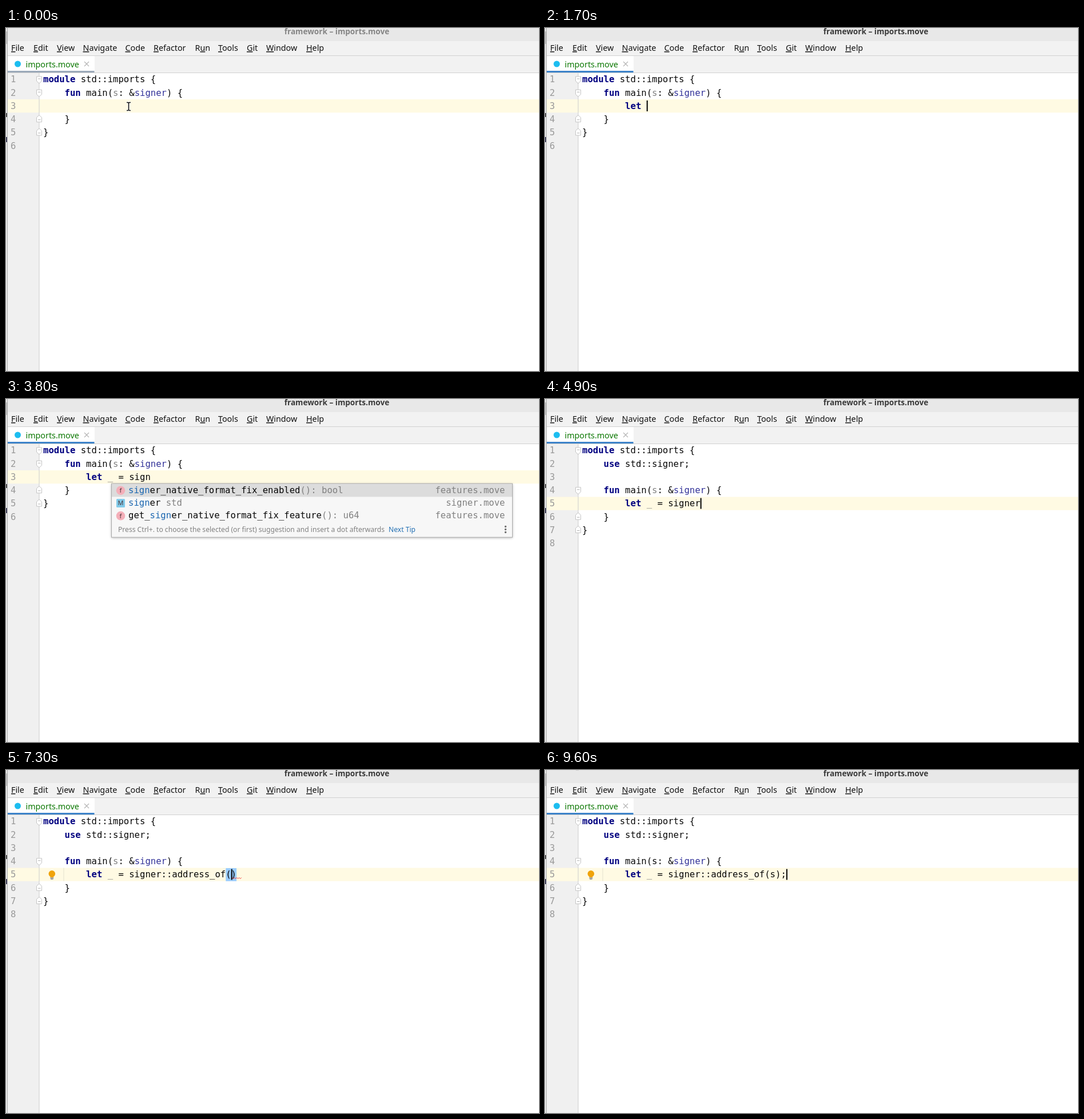
Recreate the animation shown at these times as an HTML page. Size 932x601 px, loop 9700 ms.

```html
<!DOCTYPE html>
<html lang="en">
<head>
<meta charset="utf-8">
<title>Code completion</title>
<style>
  html, body { margin: 0; width: 100%; height: 100%; overflow: hidden; background: #fff; }
  svg { display: block; width: 932px; height: 601px; }
  text { white-space: pre; font: 14.3px "Noto Sans", "Open Sans", sans-serif; fill: #111; }
  .code { font: 15.6px "DejaVu Sans Mono", monospace; fill: #080808; }
  .kw { font-weight: bold; fill: #000080; }
  .off { fill: #808080; }
  .type { fill: #333399; }
  .num { fill: #999; }
  .hit { fill: #1a66b0; }
  .end { text-anchor: end; }
  .tip { font-size: 12.1px; fill: #808080; }
  .link { fill: #2470b3; }
  .key { text-decoration: underline; }
</style>
</head>
<body>
<svg viewBox="0 0 932 601"><g id="frame"></g><g id="editor"></g></svg>
<script>
const LOOP = 9700, CH = 9.391, LEFT = 65, LINE = 23.25, ROW = 22.2;

// name | signature | file | icon
const letItems = [
  "let||| ", "length|(v: &vector<Element>): u64|vector.move|f",
  "length|(s: &String): u64|string.move|f", "destroy_empty|(v: vector<Element>)|vector.move|f"];
const nativeFix = "signer_native_format_fix_enabled|(): bool|features.move|f";
const signerMod = "signer| std|signer.move|M";
const nativeFeature = "get_signer_native_format_fix_feature|(): u64|features.move|f";
const sigItems = [
  nativeFix, signerMod, nativeFeature,
  "signature_length|(): u64|ed25519.move|f", "signature_to_bytes|(): vector<u8>|ed25519.move|f",
  "new_signature|(): Signature|ed25519.move|f", "verify_signature|(): bool|ed25519.move|f",
  "bls_signature|(): bool|features.move|f", "multi_signature|(): bool|features.move|f",
  "get_signature_feature|(): u64|features.move|f", "aggregate_signatures|(): bool|bls12381.move|f",
  "signature_verify|(): bool|bls12381.move|f"];
const addItems = ["address_of|(s: &signer): address|signer.move|f",
  "borrow_address|(s: &signer): &address|signer.move|f"];
const allItems = [...addItems, "signer_address|(): address|signer.move|f", "is_address|(): bool|signer.move|f"];

const list = (prefix, items, width, pick = 0, rows = items.length) => ({ prefix, items, width, pick, rows });
const signList = pick => list("sign", [nativeFix, signerMod, nativeFeature], 701, pick);
const call = "let _ = signer::address_of";

// Each step changes part of the state that came before it.
const steps = [
  [0, { text: "", mouse: true, caret: false, back: 0 }],
  [500, { focus: true, caret: true }],
  [1200, { text: "l", mouse: false }],
  [1300, { text: "le" }],
  [1400, { popup: list("le", letItems, 701) }],
  [1500, { text: "let", popup: null }],
  [1700, { text: "let " }],
  [1900, { text: "let _" }],
  [2100, { text: "let _ " }],
  [2300, { text: "let _ =" }],
  [2500, { text: "let _ = " }],
  [2800, { text: "let _ = s" }],
  [3000, { text: "let _ = sig", popup: list("sig", sigItems, 701, 0, 11.5) }],
  [3200, { text: "let _ = sign", popup: signList(0) }],
  [3800, { caret: false }],
  [4000, { caret: true, popup: signList(1) }],
  [4700, { text: "let _ = signer", popup: null }],
  [4900, { imported: true }],
  [5100, { unused: true, guide: true }],
  [5700, { text: "let _ = signer:" }],
  [5800, { text: "let _ = signer::", popup: list("", allItems, 593) }],
  [6100, { text: "let _ = signer::a", popup: list("a", allItems, 593) }],
  [6200, { text: "let _ = signer::ad", popup: list("ad", addItems, 593), wave: [26, 27] }],
  [6500, { text: call + "()", back: 1, popup: null, wave: null }],
  [6700, { unused: false, braces: true, wave: [35, 37] }],
  [7300, { bulb: true }],
  [7400, { text: call + "(s)", bulb: false, usage: true, wave: [37, 38] }],
  [7800, { back: 0 }],
  [7900, { text: call + "(s);", braces: false, usage: false, wave: [38, 39] }],
  [8200, { used: true, wave: null }],
  [8800, { bulb: true }],
  [8900, { caret: false }],
  [9100, { caret: true }],
  [9400, { caret: false }],
  [9600, { caret: true, peek: true }]
];
let last = {};
const states = steps.map(([at, change]) => ({ at, ...(last = { ...last, ...change }) }));

const esc = s => s.replace(/&/g, "&amp;").replace(/</g, "&lt;");
const rect = (x, y, w, h, fill, more = "") => `<rect x="${x}" y="${y}" width="${w}" height="${h}" fill="${fill}" ${more}/>`;
const path = (d, stroke, width = 1, fill = "none") => `<path d="${d}" stroke="${stroke}" stroke-width="${width}" fill="${fill}"/>`;
const text = (x, y, cls, body) => `<text x="${x}" y="${y}" class="${cls}">${body}</text>`;
const span = (cls, s) => `<tspan class="${cls}">${esc(s)}</tspan>`;
const dot = (x, y, r, fill) => `<circle cx="${x}" cy="${y}" r="${r}" fill="${fill}"/>`;
const colX = n => LEFT + n * CH;
const lineY = n => 78.5 + (n - 1) * LINE;

function drawFrame(focus) {
  const menu = [[9, "_File"], [48, "_Edit"], [89, "_View"], [134.5, "_Navigate"], [208.5, "_Code"], [258, "_Refactor"],
    [330.5, "R_un"], [371, "_Tools"], [421, "_Git"], [455, "_Window"], [525, "_Help"]];
  const label = s => s.replace(/_(.)/, '<tspan class="key">$1</tspan>');
  return rect(0, 0, 932, 601, "#fff")
    + rect(0, 0, 932, 23, "#e8e8e8")
    + rect(0, 23, 932, 55, "#f2f2f2")
    + rect(0, 48, 932, 1, "#d1d1d1")
    + `<text x="578.5" y="11" text-anchor="middle" style="font-size:13.6px;font-weight:600;fill:${focus ? "#3a3a3a" : "#858585"}">framework – imports.move</text>`
    + menu.map(([x, s]) => text(x, 40, "", label(s))).join("")
    + rect(3, 49, 152, 27, "#fff")
    + rect(3, 75, 151.5, 3, focus ? "#3d83c9" : "#9ba9b9")
    + rect(3, 78, 929, 1, "#d1d1d1")
    + dot(20.5, 63, 5.5, "#1cbdf0")
    + `<text x="34.5" y="68.5" style="fill:#0a7700">imports.move</text>`
    + path("M137 59l8 8m0-8l-8 8", "#b3b3b3", 1.1)
    + rect(3, 79, 55, 522, "#f0f0f0")
    + rect(0, 0, 2, 601, "#ececec") + rect(0, 6, 2, 22, "#c4c4c4")
    + rect(2, 0, 1, 601, "#a6a6a6")
    + rect(0, 149, 1.5, 7, "#222") + rect(0, 191, 1.5, 9, "#113");
}

function fold(line, closing) {
  const y = lineY(line) + 11.5, k = closing ? -1 : 1;
  return path(`M53.5 ${y - 5 * k}h9v${8 * k}l-4.5 ${4 * k}l-4.5 ${-4 * k}z`, "#c4c4c4", 1, "#fff")
    + path(`M56 ${y - k}h4.5`, "#b0b0b0");
}

function wave([from, to], line) {
  const y = lineY(line) + 19;
  let d = `M${colX(from)} ${y}`;
  for (let i = 1, n = Math.round((to - from) * CH / 2); i <= n; i++) d += `l2 ${i % 2 ? -2 : 2}`;
  return path(d, "#f23a3a");
}

function drawPopup(p, line, col) {
  const x = Math.round(colX(col - p.prefix.length) - 31) + 0.5, y = lineY(line + 1);
  const foot = y + 1 + p.rows * ROW, h = p.rows * ROW + 27.4, right = x + p.width;
  let out = rect(x, y, p.width, h, "#f7f7f7", 'style="filter:drop-shadow(0 1px 2px #0005)"');
  p.items.forEach((item, i) => {
    const [name, tail, file, icon] = item.split("|");
    const top = y + 1 + i * ROW, mid = top + 11, at = name.indexOf(p.prefix), to = at + p.prefix.length;
    if (i === p.pick) out += rect(x, top, p.width, ROW, "#dcdcdc");
    if (icon === "f") out += dot(x + 16, mid, 7.8, "#f4afb9");
    if (icon === "M") out += rect(x + 8.5, mid - 7.5, 15, 15, "#82cbea", 'rx="1.5"');
    out += `<text x="${x + 16}" y="${mid + 4}" text-anchor="middle" style="font-size:11px;fill:#4a3438">${icon}</text>`;
    out += text(x + 29.5, top + 15.8, "code", esc(name.slice(0, at)) + span("hit", name.slice(at, to))
      + esc(name.slice(to)) + span("off", tail));
    out += text(right - 13, top + 15.8, "code off end", file);
  });
  out += rect(x, foot, p.width, 26.4, "#f7f7f7")
    + text(x + 11.5, foot + 17, "tip", "Press Ctrl+. to choose the selected (or first) suggestion and insert a dot afterwards")
    + text(x + 484.5, foot + 17, "tip link", "Next Tip");
  for (const dy of [-5, 0, 5]) out += dot(right - 12, foot + 12.7 + dy, 1.7, "#6e6e6e");
  return out + rect(x, y, p.width, h, "none", 'stroke="#a9a9a9"');
}

function drawEditor(s) {
  const shift = s.imported ? 2 : 0, main = 2 + shift, edit = 3 + shift, y = lineY(edit);
  const col = 8 + s.text.length - s.back;
  const typed = esc(s.text)
    .replace(/^let/, span("kw", "let"))
    .replace(/ _/, " " + span("off", "_"));
  const lines = {
    1: span("kw", "module") + " std::imports {",
    [main]: "    " + span("kw", "fun") + " main(" + span(s.used ? "" : "off", "s") + ": &amp;" + span("type", "signer") + ") {",
    [edit]: "        " + typed,
    [edit + 1]: "    }",
    [edit + 2]: "}"
  };
  if (s.imported) {
    lines[2] = s.unused
      ? `    <tspan class="off"><tspan font-weight="bold">use</tspan> std::signer;</tspan>`
      : "    " + span("kw", "use") + " std::signer;";
  }

  let out = rect(3, y, 929, LINE, "#fffae3") + rect(57.5, 79, 1, 522, "#cbcbcb");
  if (s.guide) out += rect(100.5, y, 1, LINE, "#e6e2d0");
  if (s.braces) {
    const open = 8 + s.text.indexOf("("), close = 8 + s.text.indexOf(")");
    for (const c of [open, close]) out += rect(colX(c), y + 0.5, CH, LINE - 0.5, "#99ccff");
  }
  if (s.usage) {
    out += rect(colX(13), lineY(main) + 1, CH, LINE - 1, "#e4e4ff")
      + rect(colX(35), y + 1, CH, LINE - 1, "#e4e4ff");
  }
  for (let n = 1; n <= 6 + shift; n++) {
    out += text(8, lineY(n) + 16.8, "code num", n);
    if (lines[n]) out += text(LEFT, lineY(n) + 16.8, "code", lines[n]);
  }
  out += fold(1) + fold(main) + fold(edit + 1, true) + fold(edit + 2, true);
  if (s.wave) out += wave(s.wave, edit);
  if (s.bulb) {
    out += dot(80.3, y + 10.3, 5.8, "#f0a30a") + rect(77.5, y + 13, 5.6, 3.5, "#f0a30a")
      + rect(77.3, y + 17, 6, 1.2, "#6e6e6e") + rect(78, y + 19, 4.6, 1.2, "#6e6e6e");
  }
  if (s.caret) out += rect(colX(col), y + 2, 2, 19, "#000");
  if (s.popup) out += drawPopup(s.popup, edit, col);
  if (s.mouse) {
    const beam = "M211 130.5h2.3l1.2 1l1.2-1h2.3M214.5 131v13M211 144.5h2.3l1.2-1l1.2 1h2.3";
    out += path(beam, "#fff", 3.5) + path(beam, "#111", 1.6);
  }
  if (s.peek) out += rect(54, 0, 5, 1, "#cfcfcf");
  return out;
}

const frame = document.getElementById("frame"), editor = document.getElementById("editor");
const start = performance.now();
let shown = null;
function tick() {
  const t = (performance.now() - start) % LOOP;
  const s = states.findLast(state => state.at <= t);
  if (s !== shown) {
    frame.innerHTML = drawFrame(s.focus);
    editor.innerHTML = drawEditor(s);
    shown = s;
  }
  requestAnimationFrame(tick);
}
tick();
</script>
</body>
</html>
```
